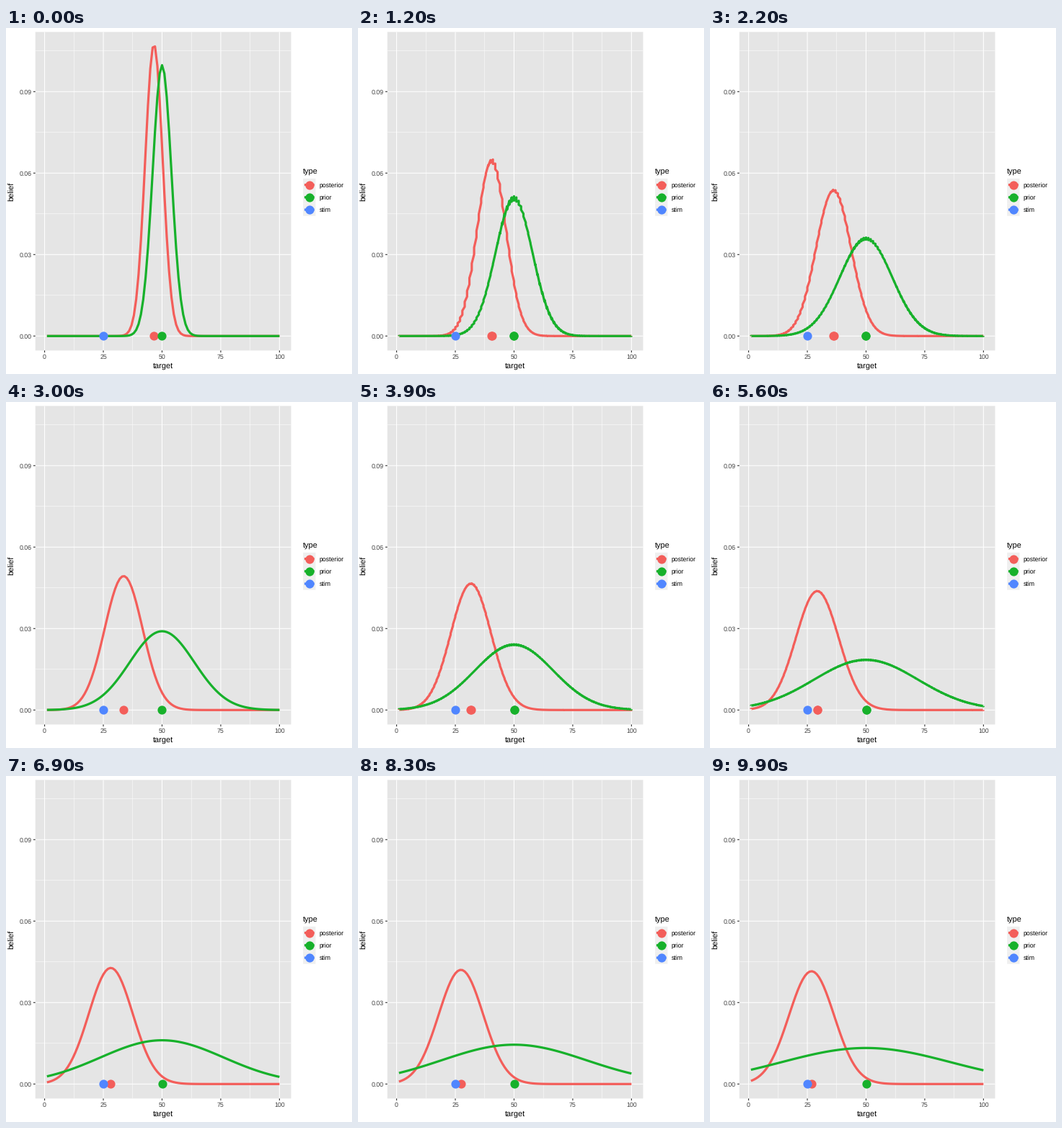
Recreate the animation shown at these times as a matplotlib script. Size 480 by 480 pixels, loop 10 s.

```python
import numpy as np
import matplotlib.pyplot as plt
from matplotlib.animation import FuncAnimation
from matplotlib.patches import Rectangle

plt.rcParams.update({
    "font.family": "Liberation Sans",
    "text.hinting": "none",
    "path.snap": False,
})

SIZE, DPI, FRAMES = 480, 72, 100
LEFT, RIGHT, TOP, BOTTOM = 40.7, 395.5, 5.5, 447.4
RED, GREEN, BLUE = "#F35E5A", "#17B12B", "#5086FF"
LINE, DOT = 3.2, 12.2

# Beliefs on a grid: a prior that widens, combined with a fixed stimulus
GRID = np.arange(1, 101)
PRIOR_MEAN, STIM, STIM_SD = 50, 25, 10
SDS = np.linspace(4, 36, 129)
SLOT = np.round((FRAMES - 1) * (SDS - SDS[0]) / np.ptp(SDS)).astype(int)


def bell(mean, sd):
    return np.exp(-0.5 * ((GRID - mean) / sd) ** 2)


def normalise(p):
    return p / p.sum()


def beliefs(sd):
    prior = bell(PRIOR_MEAN, sd)
    return normalise(prior * bell(STIM, STIM_SD)), normalise(prior)


Y_MAX = max(p.max() for p in beliefs(SDS[0]))


def px(x):
    return LEFT + (np.asarray(x) + 3.95) * (RIGHT - LEFT) / 108.9


def py(y):
    return BOTTOM - (np.asarray(y) / Y_MAX + 0.05) * (BOTTOM - TOP) / 1.1


fig = plt.figure(figsize=(SIZE / DPI, SIZE / DPI), dpi=DPI, facecolor="white")
ax = fig.add_axes([0, 0, 1, 1])
ax.set(xlim=(0, SIZE), ylim=(SIZE, 0))
ax.axis("off")


def box(x, y, w, h, color):
    ax.add_patch(Rectangle((x, y), w, h, fc=color, lw=0, zorder=0))


def stroke(xs, ys, color, width, z=1):
    return ax.plot(xs, ys, color=color, lw=width, zorder=z,
                   solid_capstyle="butt", solid_joinstyle="round")[0]


def dots(xs, ys, color):
    return ax.plot(xs, ys, "o", color=color, ms=DOT, mew=0, zorder=4)[0]


def label(x, y, text, size, color="black", **kw):
    ax.text(x, y, text, size=size, color=color, va="baseline", **kw)


def v_line(x, width):
    stroke([px(x)] * 2, [TOP, BOTTOM], "white", width)


def h_line(y, width):
    stroke([LEFT, RIGHT], [py(y)] * 2, "white", width)


# Panel, grid and axes
box(LEFT, TOP, RIGHT - LEFT, BOTTOM - TOP, "#E5E5E5")
for x in np.arange(12.5, 100, 25):
    v_line(x, 0.53)
for y in np.arange(0.015, 0.11, 0.03):
    h_line(y, 0.53)
for x in range(0, 101, 25):
    v_line(x, 1.07)
    stroke([px(x)] * 2, [BOTTOM, BOTTOM + 2.75], "#272727", 1.07)
    label(px(x), 459, str(x), 8.8, "#404040", ha="center")
for y in (0, 0.03, 0.06, 0.09):
    h_line(y, 1.07)
    stroke([LEFT - 2.75, LEFT], [py(y)] * 2, "#272727", 1.07)
    label(LEFT - 4.95, py(y) + 3.15, f"{y:.2f}", 8.8, "#404040", ha="right")
label((LEFT + RIGHT) / 2, 472, "target", 11, ha="center")
ax.text(13.5, (TOP + BOTTOM) / 2, "belief", size=11, rotation=90,
        ha="right", va="center")

# Legend
KEY = 17.28
label(412, 202, "type", 11)
for i, (name, color) in enumerate(
        [("posterior", RED), ("prior", GREEN), ("stim", BLUE)]):
    x, y = 412.2, 208.9 + i * KEY
    mid = y + KEY / 2
    box(x, y, KEY, KEY, "#EFEFEF")
    stroke([x + 0.1 * KEY, x + 0.9 * KEY], [mid, mid], color, LINE, 3)
    dots([x + KEY / 2], [mid], color)
    label(434.9, mid + 3.15, name, 8.8)

# Moving parts: posterior below prior, stimulus on top
curves = [stroke([], [], c, LINE, 3) for c in (RED, GREEN)]
means = [dots([], [], c) for c in (RED, GREEN)]
dots([px(STIM)], [py(0)], BLUE)


def update(frame):
    # A frame may hold two widths; each curve then visits both at every x
    states = [beliefs(sd) for sd in SDS[SLOT == frame]]
    for curve, mean, ps in zip(curves, means, zip(*states)):
        curve.set_data(px(np.repeat(GRID, len(ps))),
                       py(np.stack(ps, axis=1).ravel()))
        mean.set_data(px([GRID @ p for p in ps]), py(np.zeros(len(ps))))
    return curves + means


anim = FuncAnimation(fig, update, frames=FRAMES, interval=100,
                     repeat=True, repeat_delay=0)
plt.show()
```
